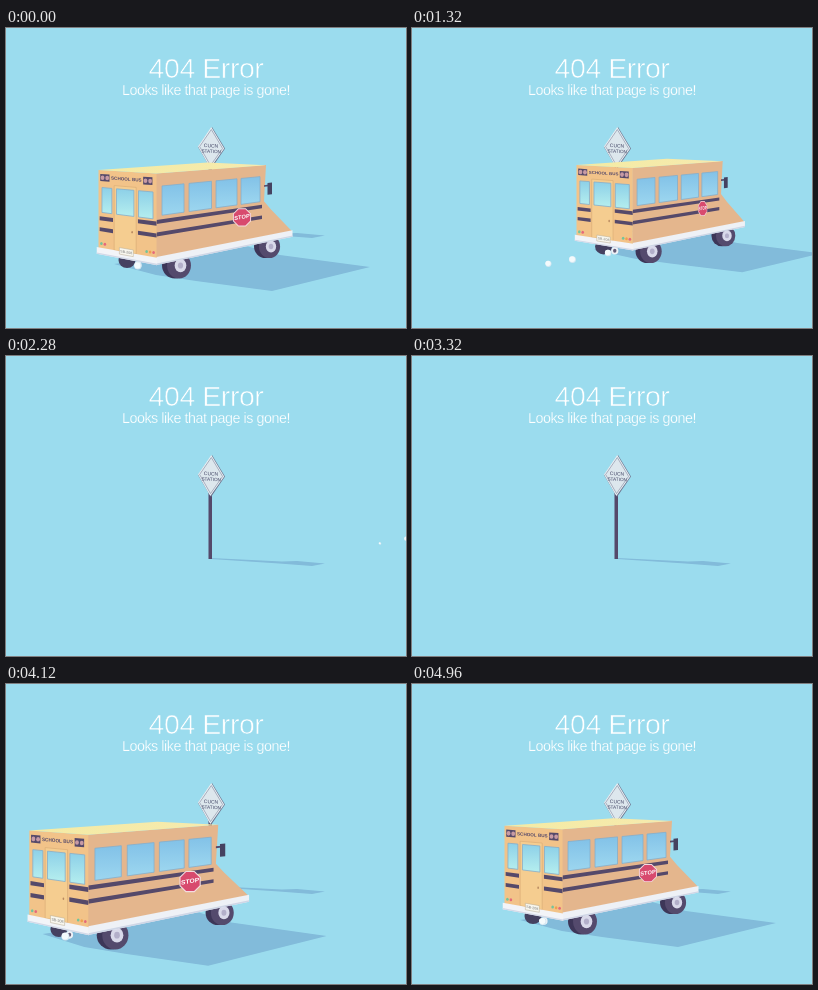
An HTML page with a canvas for the animation above (5000 ms loop, 400 by 300 pixels).

```html
<!DOCTYPE html>
<html lang="en">
<head>
<meta charset="utf-8">
<title>404 Error</title>
<style>
  html, body { margin: 0; width: 100%; height: 100%; overflow: hidden; background: #9bdcee; }
  canvas { display: block; }
</style>
</head>
<body>
<canvas id="stage" width="400" height="300"></canvas>
<script>
const ctx = document.getElementById('stage').getContext('2d');
const LOOP = 5000, SKY = '#9bdcee', SHADOW = '#82bbda', DARK = '#55496a', FONT = '"Liberation Sans", Arial, sans-serif';
const VX = 850, VY = 92; // vanishing point of the road
let travel = 0, bounce = 0, swing = 1;

// Distance driven from the stop, in units of the depth of the near rear corner.
function travelAt(ms) {
  const t = ms / 1000;
  if (t < 0.6) return 0;
  if (t < 0.9) return -0.0015 * (1 - Math.cos((t - 0.6) / 0.3 * Math.PI));
  if (t < 1.42) return 0.646 * (t - 0.9) ** 2 - 0.003;
  if (t < 2.6) return 0.1717 + 0.672 * (t - 1.42);
  if (t < 3.84) return -0.204 + 0.49 * (t - 3.84);
  return -0.297 * Math.max(0, 4.668 - t) ** 2;
}

// Apparent width of the stop sign, which turns away as the bus leaves.
function swingAt(ms) {
  return ms > 2600 ? 1 : 1 - 0.4 * Math.min(1, Math.max(0, (ms - 500) / 700));
}

// Moves a point at rest, with depth w, along the road.
function project(x, y, w, lift = bounce) {
  const k = w / (w + travel);
  return [VX + (x - VX) * k, VY + (y - VY) * k + lift];
}

// Surfaces of the bus. On the side, y is the height measured at the rear corner.
const side = (x, y) => {
  const w = 700 / (VX - x);
  return project(x, VY + (y - VY) / w, w);
};
const rear = (u, v) => {
  const x = 92.5 + 58 * u;
  return project(x, 142 + 3.5 * u + v * (84 + 7.5 * u), 1 / (1 + 0.001 * (x - 150.5)));
};
const ground = (x, y) => project(x, y, 1 / (1 - 0.000338 * (x - 152) + 0.00641 * (y - 240)), 0);

function polygon(points, fill, stroke, width = 1) {
  ctx.beginPath();
  points.forEach(p => ctx.lineTo(p[0], p[1]));
  ctx.closePath();
  if (fill) { ctx.fillStyle = fill; ctx.fill(); }
  if (stroke) { ctx.strokeStyle = stroke; ctx.lineWidth = width; ctx.stroke(); }
}

function quad(surface, a, b, c, d, fill, stroke, width) {
  polygon([surface(a, b), surface(c, b), surface(c, d), surface(a, d)], fill, stroke, width);
}

function ellipse([x, y], rx, ry, fill) {
  ctx.beginPath();
  ctx.ellipse(x, y, rx, ry, 0, 0, 2 * Math.PI);
  ctx.fillStyle = fill;
  ctx.fill();
}

// Text lying on a surface; da and db span about ten pixels.
function label(surface, text, a, b, da, db, font, fill) {
  const p = surface(a, b), q = surface(a + da, b), r = surface(a, b + db);
  ctx.save();
  ctx.transform((q[0] - p[0]) / 10, (q[1] - p[1]) / 10, (r[0] - p[0]) / 10, (r[1] - p[1]) / 10, p[0], p[1]);
  ctx.font = font + ' ' + FONT;
  ctx.fillStyle = fill;
  ctx.textAlign = 'center';
  ctx.textBaseline = 'middle';
  ctx.fillText(text, 0, 0);
  ctx.restore();
}

// A background-coloured outline gives the letters a light weight.
function heading(text, y, size, thinning) {
  ctx.save();
  ctx.font = size + 'px ' + FONT;
  ctx.letterSpacing = '-0.45px';
  ctx.textAlign = 'center';
  ctx.lineJoin = 'round';
  ctx.fillStyle = '#fff';
  ctx.fillText(text, 200, y);
  ctx.strokeStyle = SKY;
  ctx.lineWidth = thinning;
  ctx.strokeText(text, 200, y);
  ctx.restore();
}

function drawSign() {
  polygon([[205, 202], [276, 205.6], [291, 205], [319, 207.5], [306, 210], [273, 207.5], [205, 203]], SHADOW);
  ctx.fillStyle = DARK;
  ctx.fillRect(202.5, 137, 3.5, 66);
  polygon([[206, 99], [219, 120.5], [205, 141], [192, 119]], '#6d7690');
  polygon([[205.3, 99], [218.2, 120.5], [204.3, 140], [192, 118.5]], '#eaf1f5');
  polygon([[205.3, 101.5], [216.6, 120.4], [204.5, 137.6], [193.6, 118.5]], '#dde7ed', '#7c849a', 0.6);
  const face = (x, y) => [x, y + (x - 205) * 0.04];
  label(face, 'CUCN', 205, 118, 10, 10, '5px', '#3f4263');
  label(face, 'STATION', 205.2, 123.6, 10, 10, '4.7px', '#3f4263');
}

function drawWheel(x, y, r) {
  const w = 700 / (VX - x), k = w / (w + travel), [cx, cy] = project(x, y, w, 0);
  ellipse([cx - 4 * k, cy], r * k, r * k, '#3d3658');
  ellipse([cx, cy], r * 0.92 * k, r * k, '#544a6d');
  ellipse([cx + 1.5 * k, cy], r * 0.45 * k, r * 0.52 * k, '#d9d9ea');
  ellipse([cx + 1.5 * k, cy], r * 0.2 * k, r * 0.24 * k, '#b3afca');
}

function pane(surface, a, b, c, d, upper, lower) {
  const glass = ctx.createLinearGradient(0, surface(a, b)[1], 0, surface(a, d)[1]);
  glass.addColorStop(0, upper);
  glass.addColorStop(1, lower);
  quad(surface, a, b, c, d, glass, '#86aecb', 0.8);
}

function drawSide() {
  polygon([side(150, 145.5), side(260, 145.5), side(258, 188), side(265, 199), side(286, 230), side(150, 232)], '#e4b68d');
  [[156, 178], [183, 205.5], [210, 231], [235, 254]]
    .forEach(([a, b]) => pane(side, a, 158.5, b, 188, '#84c3e8', '#9cd6ef'));
  quad(side, 150.5, 192, 256, 196, DARK);
  quad(side, 150.5, 204.5, 256, 208.5, DARK);
  quad(side, 150.5, 229, 286.5, 237, '#eef1f6');
  quad(side, 150.5, 235.5, 286.5, 237, '#cfd6e6');

  const k = side(237, 190)[0] - side(236, 190)[0];
  const [sx, sy] = side(236, 203);
  const octagon = r => Array.from({ length: 8 }, (_, i) => {
    const angle = (i + 0.5) * Math.PI / 4;
    return [sx + r * k * swing * Math.cos(angle), sy + r * k * Math.sin(angle)];
  });
  polygon(octagon(9.8), '#f3dbe0');
  polygon(octagon(8.8), '#d84a6e');
  label(side, 'STOP', 236, 203, 10 * swing, 11.4, 'bold 5.7px', '#fff');

  quad(side, 258, 169, 263, 171, DARK);
  quad(side, 261.5, 167, 266, 181, '#454260');
}

function drawRear() {
  quad(rear, 0, 0, 1, 0.93, '#f2c389');
  quad(rear, 0.27, 0.17, 0.65, 0.92, '#f5cd90', '#dcae78', 0.7);
  [[0.06, 0.23], [0.31, 0.61], [0.69, 0.94]]
    .forEach(([a, b]) => pane(rear, a, 0.205, b, 0.5, '#8dd0e8', '#b2ecee'));
  for (const v of [0.525, 0.655]) {
    quad(rear, 0.02, v + 0.025, 0.25, v + 0.07, DARK);
    quad(rear, 0.68, v, 1, v + 0.045, DARK);
  }
  for (const u of [0.11, 0.85]) {
    quad(rear, u - 0.08, 0.045, u + 0.08, 0.13, DARK);
    ellipse(rear(u - 0.04, 0.088), 1.9, 2.3, '#c79aa4');
    ellipse(rear(u + 0.04, 0.088), 1.9, 2.3, '#c79aa4');
  }
  label(rear, 'SCHOOL BUS', 0.48, 0.088, 10 / 58, 10 / 88, 'bold 4.6px', DARK);
  ellipse(rear(0.58, 0.68), 0.8, 1.2, '#b98a61');
  [['#73c49b', 0.05], ['#e5697b', 0.11], ['#73c49b', 0.83], ['#f0a04f', 0.89], ['#e5697b', 0.95]]
    .forEach(([color, u]) => ellipse(rear(u, 0.87), 1.3, 1.5, color));
  quad(rear, -0.03, 0.92, 1.01, 1, '#f2f4f8');
  quad(rear, -0.03, 0.985, 1.01, 1, '#d3d9e8');
  quad(rear, 0.36, 0.88, 0.6, 0.955, '#f8f7ef', '#b6a98f', 0.5);
  label(rear, 'SB-208', 0.48, 0.92, 10 / 58, 10 / 88, '3.6px', '#777');
}

const pipe = () => project(132, 237, 1.02, 0);

function drawBus() {
  polygon([[108, 236], [150, 247], [190, 253], [266, 263], [364, 239], [274, 227], [240, 218]]
    .map(p => ground(...p)), SHADOW);
  ellipse(project(121, 232, 1.04, 0), 8.5, 8, '#454160');
  drawWheel(173, 237.5, 13);
  drawWheel(263.5, 218.5, 11.5);
  ellipse(pipe(), 3.6, 3.8, '#eef1f6');
  ellipse(pipe(), 1.7, 2, '#665d78');
  drawSide();
  drawRear();
  const roof = [project(92.5, 142, 1.06), project(150.5, 145.5, 1), project(260, 137.2, 1.186), project(201.5, 134.5, 1.24)];
  const light = ctx.createLinearGradient(roof[0][0], 0, roof[2][0], 0);
  light.addColorStop(0, '#f4eba4');
  light.addColorStop(1, '#f6eaae');
  polygon(roof, light);
}

const puffTimes = [];
for (let t = -13; t < 1000; t += 176) puffTimes.push(t);
for (let t = 1040; t < 2300; t += 130) puffTimes.push(t);
for (let t = 3403; t < LOOP; t += 176) puffTimes.push(t);

function drawPuffs(time) {
  for (const start of puffTimes) {
    const age = (time - start) / 360;
    if (age < 0 || age > 1) continue;
    travel = travelAt(start);
    const [x, y] = pipe(), size = 3.6 * (1 - age ** 8) / (1 + travel);
    ellipse([x - 3 * age, y + 1 - age], size, size, '#d5e8f2');
    ellipse([x - 3 * age - 0.4, y + 0.5 - age], size * 0.85, size * 0.85, '#f4fafc');
  }
}

function draw(time) {
  ctx.fillStyle = SKY;
  ctx.fillRect(0, 0, 400, 300);
  heading('404 Error', 50, 28.5, 0.7);
  heading('Looks like that page is gone!', 67, 14.3, 0.25);
  drawSign();
  travel = travelAt(time);
  swing = swingAt(time);
  bounce = 0.35 * Math.sin(time / 125 * 2 * Math.PI);
  if (time < 2450 || time > 3180) drawBus();
  drawPuffs(time);
}

function tick() {
  draw(performance.now() % LOOP);
  requestAnimationFrame(tick);
}
tick();
</script>
</body>
</html>
```
